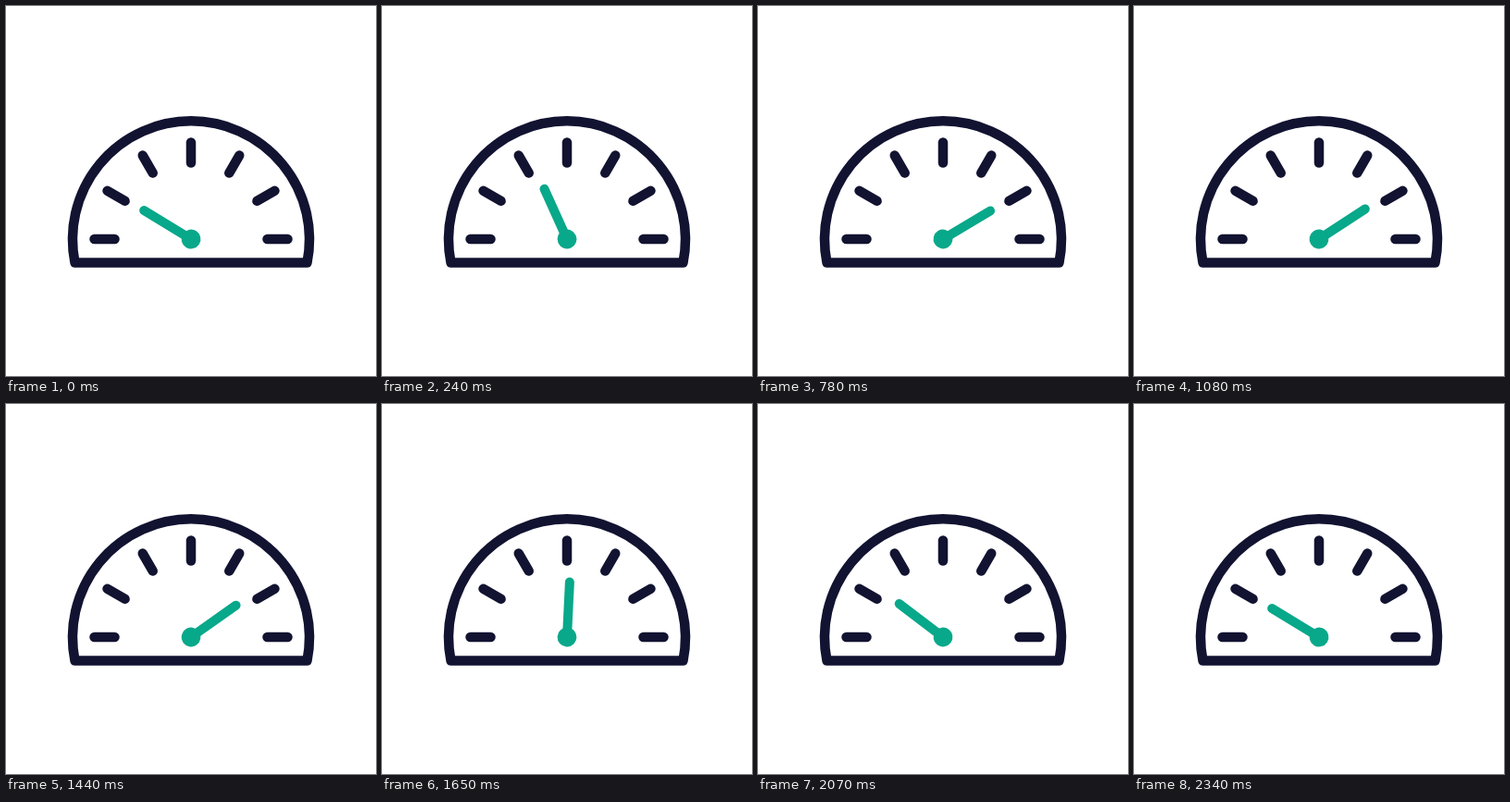
Write an HTML page that moves like this. It is 400x400 px and loops after 4.4 s.

```html
<!DOCTYPE html>
<html lang="en">
<head>
<meta charset="utf-8">
<title>Gauge</title>
<style>
  html, body { margin: 0; width: 100%; height: 100%; overflow: hidden; background: #fff; }
  svg { display: block; width: 100%; height: 100%; }
</style>
</head>
<body>
<svg viewBox="0 0 400 400">
  <g fill="none" stroke="#121331" stroke-width="10.5" stroke-linecap="round" stroke-linejoin="round">
    <path d="M74.5 277.5A128 128 0 1 1 325.5 277.5Z"/>
    <g id="ticks"></g>
  </g>
  <g id="needle" fill="#08a88a" stroke="#08a88a" stroke-linecap="round">
    <path d="M200 252V192.5" stroke-width="10"/>
    <circle cx="200" cy="252" r="10.4" stroke="none"/>
  </g>
</svg>
<script>
const LOOP = 4400, STEP = 30, REST = -58.7;
const ticks = document.getElementById('ticks');
const needle = document.getElementById('needle');

for (let a = -90; a <= 90; a += 30) {
  const tick = document.createElementNS('http://www.w3.org/2000/svg', 'path');
  tick.setAttribute('d', 'M200 147.5V169.5');
  tick.setAttribute('transform', `rotate(${a} 200 252)`);
  ticks.append(tick);
}

function bezier(x1, y1, x2, y2) {
  const at = (s, a, b) => 3 * a * s * (1 - s) ** 2 + 3 * b * s * s * (1 - s) + s ** 3;
  return x => {
    let lo = 0, hi = 1;
    for (let i = 0; i < 24; i++) {
      const mid = (lo + hi) / 2;
      if (at(mid, x1, x2) < x) lo = mid; else hi = mid;
    }
    return at(lo, y1, y2);
  };
}

const sway = bezier(.42, 0, .58, 1);
// start, end, turn from, turn to, easing
const moves = [
  [0, 600, 0, 120, bezier(.4, .05, .73, .9)],
  [600, 990, 120, 115, sway],
  [990, 1372, 115, 120, sway],
  [1372, 2340, 120, 0, bezier(.25, .1, .25, 1)]
];

function turn(t) {
  const move = moves.find(m => t < m[1]);
  if (!move) return 0;
  const [start, end, from, to, ease] = move;
  return from + (to - from) * ease((t - start) / (end - start));
}

function draw() {
  const t = Math.floor(performance.now() % LOOP / STEP) * STEP;
  needle.setAttribute('transform', `rotate(${REST + turn(t)} 200 252)`);
  requestAnimationFrame(draw);
}
draw();
</script>
</body>
</html>
```
